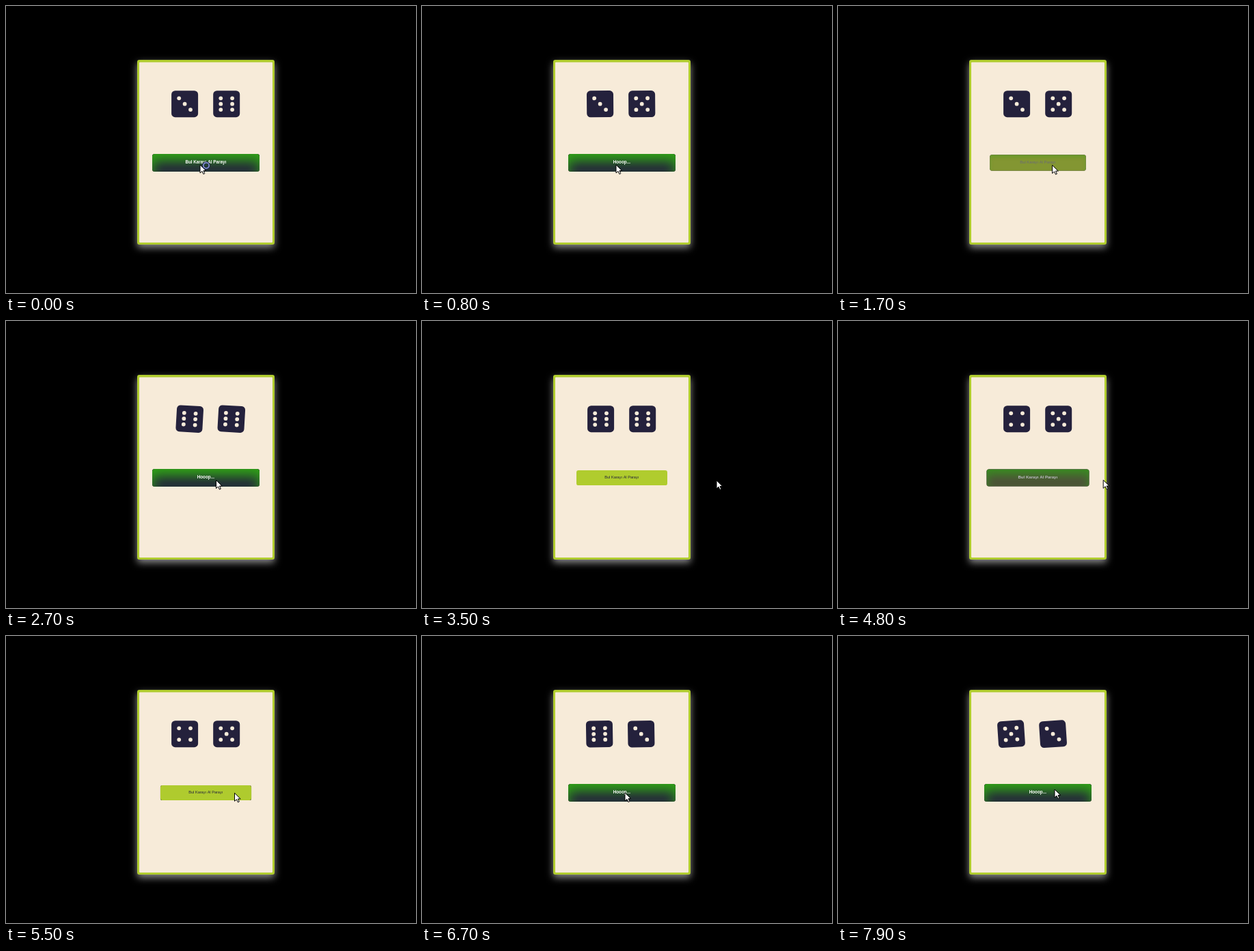
An HTML page with a canvas for the animation above (8 s loop, 600 px wide and 421 px high).

```html
<!DOCTYPE html>
<html lang="tr">
<head>
<meta charset="utf-8">
<title>Zar</title>
<style>
  html, body { margin: 0; width: 100%; height: 100%; overflow: hidden; background: #000; }
  canvas { display: block; }
</style>
</head>
<body>
<canvas id="stage" width="600" height="421"></canvas>
<script>
const ctx = document.getElementById('stage').getContext('2d');
const LOOP = 8000, STEP = 100, ROLL = 1000, FADE = 300;
const LIME = [176, 204, 46], NAVY = [36, 33, 60], CREAM = [247, 235, 217], WHITE = [255, 255, 255];
const DIE = 39, PIP = 8.4;

// Each round: a click rolls the dice, then the pointer swings away and comes back.
const firstFaces = [3, 6];
const rounds = [
  { roll: 120, faces: [3, 5], x: 284, y: 233, leave: 800, back: 1707, reach: 260, drop: 7 },
  { roll: 2390, faces: [6, 6], x: 307.5, y: 233.5, leave: 2850, back: 3750, reach: 157, drop: 97 },
  { roll: 3780, faces: [4, 5], x: 312, y: 234, leave: 4650, back: 5567, reach: 160, drop: 0 },
  { roll: 5950, faces: [6, 3], x: 297, y: 230, leave: 6700, back: 7600, reach: 180, drop: 100 },
  { roll: 7820, faces: [5, 3], x: 317, y: 225, leave: 9000, back: 9900, reach: 0, drop: 0 }
];

const mix = (a, b, k) => a + (b - a) * k;
const clamp = x => Math.min(1, Math.max(0, x));
const blend = (a, b, k) => `rgb(${a.map((v, i) => Math.round(mix(v, b[i], k)))})`;
const rgb = c => blend(c, c, 0);

// cubic-bezier(.25, .1, .25, 1)
function ease(x) {
  if (x <= 0) return 0;
  if (x >= 1) return 1;
  let lo = 0, hi = 1, s = .5;
  for (let i = 0; i < 20; i++) {
    s = (lo + hi) / 2;
    if (.75 * s * (1 - s) + s ** 3 < x) lo = s; else hi = s;
  }
  return .3 * s * (1 - s) ** 2 + 3 * s * s * (1 - s) + s ** 3;
}

// Swings alternate in direction and shrink evenly to rest.
function wobble(p) {
  const swing = n => n ? (-1) ** n * (.3 - .05 * n) : 0;
  const n = Math.min(5, Math.floor(p / .15));
  const span = n === 5 ? .25 : .15;
  return mix(swing(n), swing(n + 1), ease((p - n * .15) / span));
}

function pointerAt(t) {
  const i = rounds.findIndex(r => t < r.back);
  const a = rounds[i], b = rounds[i + 1] || a;
  const u = clamp((t - a.leave) / (a.back - a.leave));
  return [
    mix(a.x, b.x, u) + a.reach * Math.sin(Math.PI * u),
    mix(a.y, b.y, u) + a.drop * Math.max(0, Math.sin(2 * Math.PI * u))
  ];
}

function hoverAt(t) {
  return Math.min(...rounds.map(r =>
    Math.max(1 - ease((t - r.leave - 90) / FADE), ease((t - r.back + 70) / FADE))));
}

function box(x, y, w, h, r) {
  ctx.beginPath();
  ctx.roundRect(x, y, w, h, r);
}

function drawCard() {
  ctx.save();
  ctx.shadowColor = 'rgba(255,255,255,.55)';
  ctx.shadowBlur = 11;
  ctx.shadowOffsetY = 4.5;
  ctx.fillStyle = rgb(LIME);
  box(192, 79, 201, 271, 3);
  ctx.fill();
  ctx.restore();
  ctx.fillStyle = rgb(CREAM);
  box(195, 82.5, 195, 264.5, 1);
  ctx.fill();
}

function pips(n) {
  const list = n % 2 ? [[0, 0]] : [];
  if (n > 1) list.push([-1, -1], [1, 1]);
  if (n > 3) list.push([1, -1], [-1, 1]);
  if (n === 6) list.push([-1, 0], [1, 0]);
  return list;
}

function drawDie(cx, n, swing) {
  ctx.save();
  ctx.translate(cx + swing * DIE, 143.7);
  ctx.rotate(swing * 18 * Math.PI / 180);
  ctx.fillStyle = rgb(NAVY);
  box(-DIE / 2, -DIE / 2, DIE, DIE, 5.5);
  ctx.fill();
  ctx.fillStyle = rgb(CREAM);
  for (const [x, y] of pips(n)) {
    ctx.beginPath();
    ctx.arc(x * PIP, y * PIP, 2.9, 0, 7);
    ctx.fill();
  }
  ctx.restore();
}

function drawButton(p, label) {
  const w = mix(133, 157, p), h = w / 6, r = w / 42;
  const x = 292.5 - w / 2, y = 230 - h / 2;
  ctx.save();
  box(x, y, w, h, r);
  ctx.fillStyle = blend(LIME, NAVY, p);
  ctx.fill();
  ctx.clip();
  // inner glow cast by a frame around the button
  ctx.shadowColor = `rgba(48,164,22,${p})`;
  ctx.shadowBlur = 18 * p;
  ctx.shadowOffsetY = 11 * p;
  ctx.fillStyle = '#000';
  ctx.beginPath();
  ctx.rect(x - 50, y - 50, w + 100, h + 100);
  ctx.roundRect(x, y, w, h, r);
  if (p > 0) ctx.fill('evenodd');
  ctx.restore();

  ctx.font = `${p > .5 ? 'bold' : 'normal'} ${mix(5.6, 6.3, p)}px "Liberation Sans", Arial, sans-serif`;
  ctx.textAlign = 'center';
  ctx.fillStyle = blend(NAVY, WHITE, p);
  ctx.fillText(label, 292.3, 231.4);
}

function drawPointer(x, y, busy) {
  ctx.save();
  ctx.translate(x, y);
  ctx.lineWidth = 1;
  ctx.strokeStyle = '#000';
  ctx.fillStyle = '#fff';
  const arrow = new Path2D('M0 0V12L3 9.4L4.9 13.6L6.8 12.7L5 8.6H8.7Z');
  ctx.fill(arrow);
  ctx.stroke(arrow);
  if (busy) {
    ctx.beginPath();
    ctx.arc(9, 1, 4.2, 0, 7);
    ctx.lineWidth = 3.4;
    ctx.strokeStyle = '#1d2348';
    ctx.stroke();
    ctx.lineWidth = 1.7;
    ctx.strokeStyle = '#8292cc';
    ctx.stroke();
  }
  ctx.restore();
}

function draw(t) {
  ctx.fillStyle = '#000';
  ctx.fillRect(0, 0, 600, 421);

  const round = rounds.filter(r => r.roll <= t).pop();
  const progress = round ? clamp((t - round.roll) / ROLL) : 1;
  const [left, right] = round ? round.faces : firstFaces;
  const swing = wobble(progress);

  drawCard();
  drawDie(261.6, left, swing);
  drawDie(322.7, right, swing);
  drawButton(hoverAt(t), progress < 1 ? 'Hooop...' : 'Bul Karayı Al Parayı');
  drawPointer(...pointerAt(t), t < 200);
}

let origin;
function tick(now) {
  origin ??= now;
  draw(Math.floor((now - origin) % LOOP / STEP) * STEP);
  requestAnimationFrame(tick);
}
draw(0);
requestAnimationFrame(tick);
</script>
</body>
</html>
```
